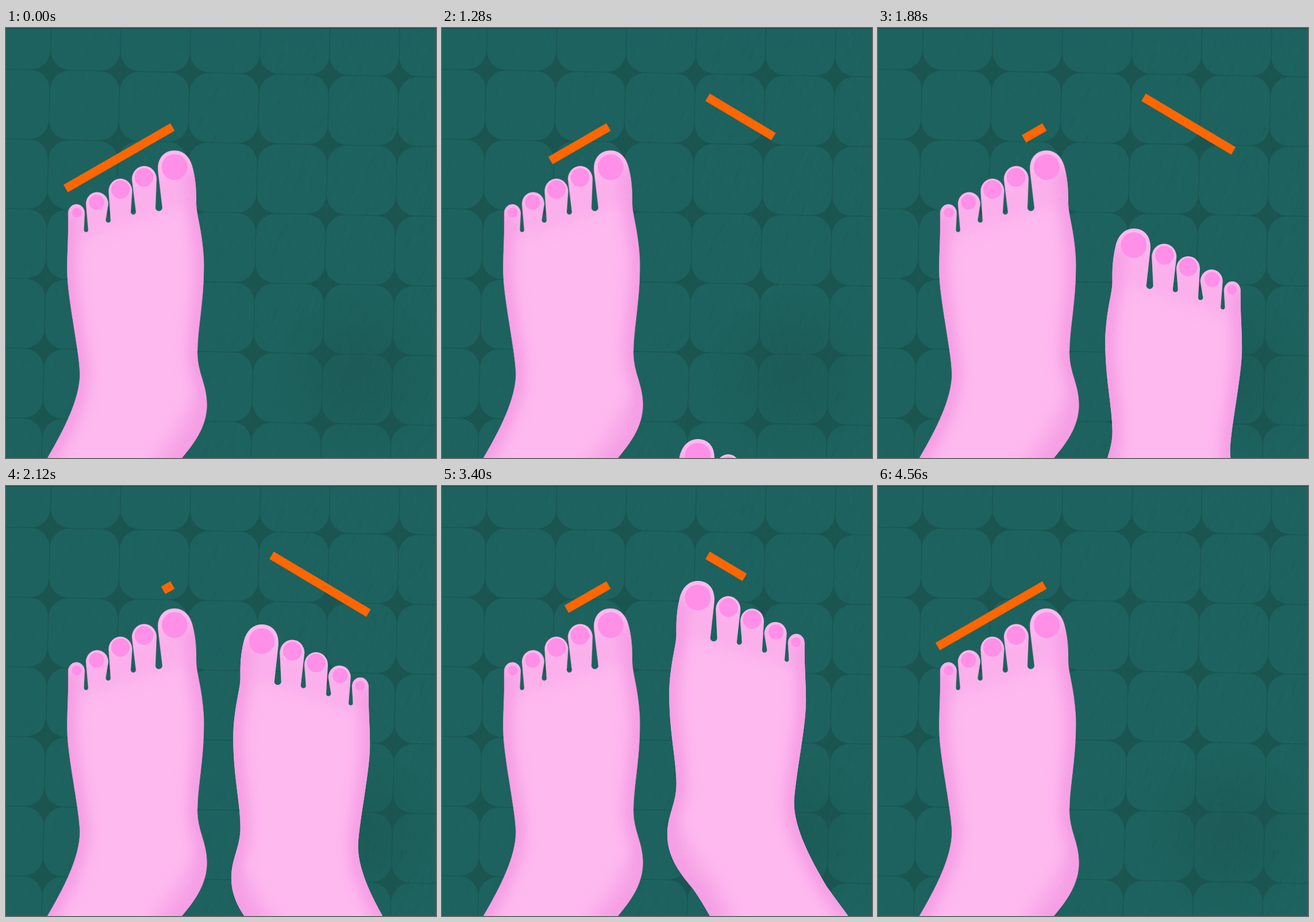
Animation of 748x748 px, one loop 5 s. Source, as an HTML page:

```html
<!DOCTYPE html>
<html lang="en">
<head>
<meta charset="utf-8">
<title>Feet on the bathroom floor</title>
<style>
  html, body { margin: 0; width: 100%; height: 100%; overflow: hidden; background: #1a5552; }
  svg { display: block; width: 100vw; height: 100vh; }
</style>
</head>
<body>
<svg viewBox="0 0 748 748">
  <defs>
    <filter id="soft" x="-50%" y="-20%" width="200%" height="140%"><feGaussianBlur stdDeviation="11"/></filter>
    <radialGradient id="dim"><stop offset="0" stop-color="#1a5350" stop-opacity=".5"/><stop offset="1" stop-color="#1a5350" stop-opacity="0"/></radialGradient>
    <clipPath id="inside"><path id="outline"/></clipPath>
    <g id="foot">
      <use href="#outline" fill="#feb9ef"/>
      <g clip-path="url(#inside)">
        <g filter="url(#soft)" fill="none" stroke="#f59de3">
          <path id="outer" stroke-width="34"/>
          <path id="inner" stroke-width="36"/>
          <path d="M365 570L325 640L290 700L255 748L220 830H370Z" fill="#f59de3" stroke="none" opacity=".55"/>
          <path d="M105 345L335 270" stroke-width="60" opacity=".3"/>
        </g>
        <path id="grain" stroke="#feb9ef" stroke-width="1.3" opacity=".5"/>
      </g>
      <g id="nails" fill="#ff8fe7"/>
    </g>
  </defs>
  <g id="tiles" fill="#1d625e" transform="matrix(1 .0182 -.0219 1 77 73)"></g>
  <circle cx="610" cy="600" r="150" fill="url(#dim)"/>
  <path id="light" stroke="#2b7770" opacity=".16" fill="none"/>
  <path id="dark" stroke="#174f4c" opacity=".2" fill="none"/>
  <rect width="748" height="1" fill="#12413f"/>
  <g stroke="#ff6600" stroke-width="15">
    <line id="barA" x1="289.7" y1="172.2"/>
    <line id="barB" x1="462" y1="120.5"/>
  </g>
  <use href="#foot"/>
  <use href="#outline" fill="none" stroke="#b07fae" stroke-width=".8" opacity=".5"/>
  <use id="stepper" href="#foot"/>
</svg>
<script>
const $ = id => document.getElementById(id);
const setPath = (id, d) => $(id).setAttribute('d', d);
const LOOP = 5000, STEP = 40;

// Foot outline: toes from the smallest, then the heel side and the outer side
const toes = 'M108 323A14.5 16 0 0 1 137 322L135.5 351A3.7 4 0 0 0 143 351L139 306' +
  'A19.5 20.5 0 0 1 178 306L173.5 334A4.3 4.5 0 0 0 182 335L178.5 284' +
  'A20.5 22 0 0 1 219.5 284L217 320A4.5 4.5 0 0 0 226 320L219 263' +
  'A21.5 23 0 0 1 262 263L260 312A6 6 0 0 0 272 313L264.5 250' +
  'C262 226 276 213 293 213C310 213 321 226 325 244';
const heelSide = 'C331 268 331 290 331 305C331 325 341 350 344 400C346 470 333 520 333 565' +
  'C333 600 349.5 620 349.5 655C349.5 695 325 725 306 748C296 762 284 782 270 808';
const outerSide = 'C40 792 57 769 72 748C100 700 129 645 128.5 600' +
  'C127 560 107 470 106.5 425C106 390 109 365 108 323';
setPath('outline', toes + heelSide + 'L29 808' + outerSide + 'Z');
setPath('inner', 'M325 244' + heelSide);
setPath('outer', 'M29 808' + outerSide);

function add(parent, tag, attrs) {
  const el = document.createElementNS('http://www.w3.org/2000/svg', tag);
  for (const k in attrs) el.setAttribute(k, attrs[k]);
  parent.appendChild(el);
}
for (const [cx, cy, r] of [[123, 321, 8.5], [157.5, 303, 13], [199, 281, 16], [240, 260, 16.3], [293.3, 242, 22.4]])
  add($('nails'), 'circle', { cx, cy, r });

// Floor of rounded tiles
for (let row = -1; row < 6; row++)
  for (let col = -1; col < 6; col++)
    add($('tiles'), 'rect', { x: col * 121.25 + .6, y: row * 121.2 + .6, width: 120, height: 120, rx: 33 });

// Seeded texture: brush marks, denser to the right, and grain along both sides of the foot
let seed = 7;
const rnd = () => (seed = (seed * 16807) % 2147483647) / 2147483647;
const many = (n, make) => Array.from({ length: n }, make).join('');
const mark = (x, y, dx, dy) => `M${x.toFixed(1)} ${y.toFixed(1)}l${dx.toFixed(1)} ${dy.toFixed(1)}`;
function brush() {
  const len = 6 + rnd() * 16;
  return mark(748 * rnd() ** .6, 748 * rnd(), -len * .3, len);
}
function speckle(side, inward) {
  const path = $(side), length = path.getTotalLength();
  return () => {
    const p = path.getPointAtLength(length * rnd());
    return mark(p.x + inward * 50 * rnd(), p.y, 1.2, 0);
  };
}
setPath('light', many(900, brush));
setPath('dark', many(900, brush));
setPath('grain', many(700, speckle('inner', -1)) + many(250, speckle('outer', 1)));

const clamp = u => Math.min(1, Math.max(0, u));
const span = (t, from, to) => clamp((t - from) / (to - from));
const smooth = u => u * u * (3 - 2 * u);
const easeOut = u => 1 - (1 - u) ** 1.5;

// Length of a bar as a share of its full run
const lengthA = t => 1 - smooth(span(t, 140, 2560)) + smooth(span(t, 2760, 4255));
const lengthB = t => easeOut(span(t, 100, 2500)) - smooth(span(t, 2500, 4010));
// The foot glides up to rest, then drops away
const footTop = t => 165 + 550 * (Math.max(0, 2400 - t) / 1120) ** 1.43 + 98 * (Math.max(0, t - 3900) / 340) ** 3;

function setBar(bar, dx, slope) {
  bar.setAttribute('x2', +bar.getAttribute('x1') + dx);
  bar.setAttribute('y2', +bar.getAttribute('y1') + Math.abs(dx) * slope);
  bar.setAttribute('visibility', Math.abs(dx) > .3 ? 'visible' : 'hidden');
}
function draw(t) {
  setBar($('barA'), -186 * lengthA(t), .576);
  setBar($('barB'), 180 * lengthB(t), .596);
  $('stepper').setAttribute('transform', `matrix(-1 .008 .008 1 736.2 ${footTop(t) - 215.3})`);
}

const start = performance.now();
function tick() {
  const t = (performance.now() - start) % LOOP;
  draw(Math.floor(t / STEP) * STEP);
  requestAnimationFrame(tick);
}
tick();
</script>
</body>
</html>
```
